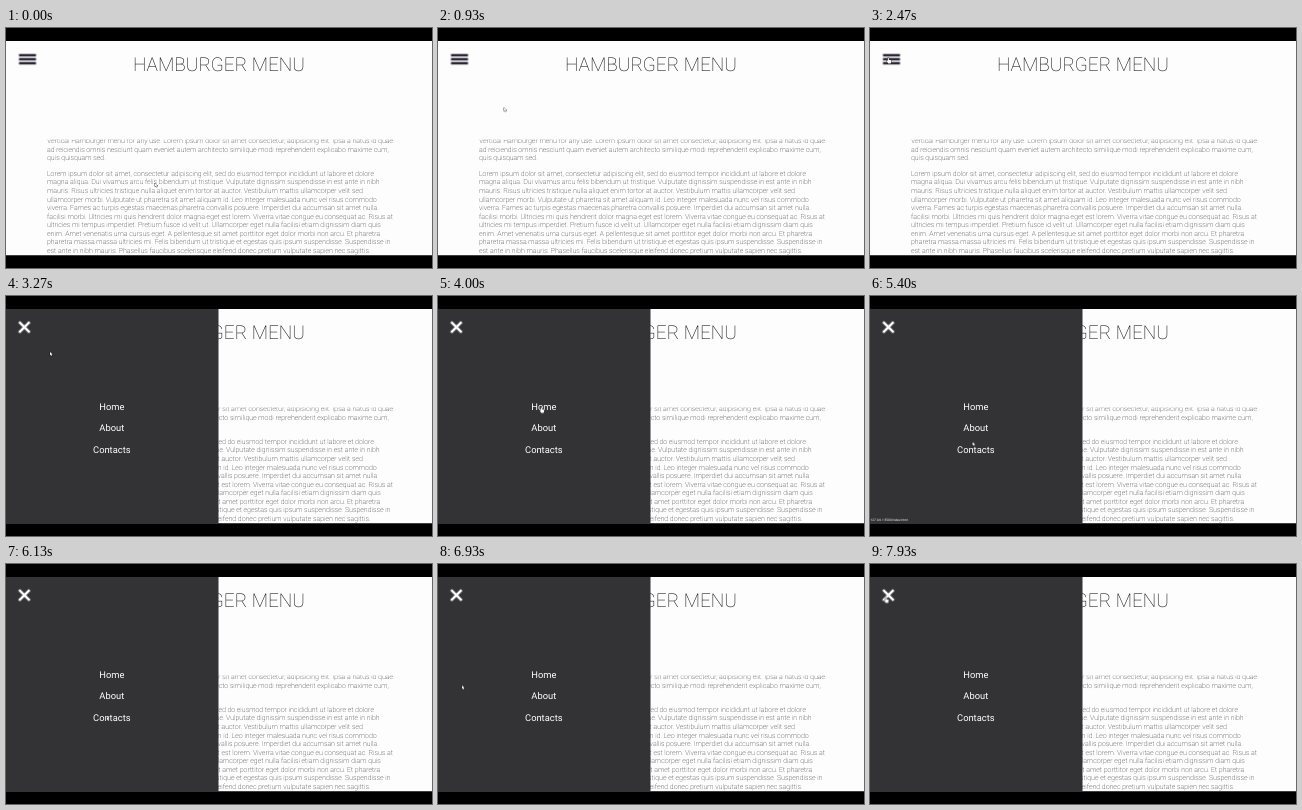
Animation, 426 px wide and 240 px high, one loop 8000 ms. Source, as an HTML page:

```html
<!DOCTYPE html>
<html lang="en">
<head>
<meta charset="utf-8">
<title>Hamburger menu</title>
<style>
  html, body { margin: 0; width: 100%; height: 100%; overflow: hidden; background: #000; }
  svg { display: block; width: 100%; height: 100%; }
  text { font-family: Roboto, sans-serif; text-rendering: geometricPrecision; }
  .title { font-size: 19px; font-weight: 100; fill: #000; text-anchor: middle; }
  .copy { font-size: 7.02px; font-weight: 100; fill: #000; }
  .links { font-size: 9.35px; fill: #fff; text-anchor: middle; }
  .status { font-size: 3.2px; fill: #fff; }

  .panel, .bar, .status, .cursor, .arrow, .hand { animation: 8s linear infinite; }
  .bar { fill: #2b2533; }
  .panel { animation-name: slide; }
  .top { animation-name: top; }
  .middle { animation-name: middle; }
  .bottom { animation-name: bottom; }
  .status { animation-name: status; animation-timing-function: step-end; }
  .cursor { animation-name: travel; }
  .arrow { animation-name: arrow; animation-timing-function: step-end; }
  .hand { animation-name: hand; animation-timing-function: step-end; }

  @keyframes slide {
    0%, 33.6% { transform: translateX(-213px); animation-timing-function: ease; }
    39.8%, 100% { transform: none; }
  }
  @keyframes top {
    0%, 33.6% { transform: translate(21.5px, 27.2px); fill: #2b2533; animation-timing-function: ease; }
    39.8%, 100% { transform: translate(18.4px, 31.2px) rotate(45deg) scaleX(.88); fill: #fff; }
  }
  @keyframes middle {
    0%, 33.6% { transform: translate(21.5px, 31.2px); opacity: 1; animation-timing-function: ease; }
    39.8%, 100% { transform: translate(21.5px, 31.2px); opacity: 0; }
  }
  @keyframes bottom {
    0%, 33.6% { transform: translate(21.5px, 35.2px); fill: #2b2533; animation-timing-function: ease; }
    39.8%, 100% { transform: translate(18.4px, 31.2px) rotate(-45deg) scaleX(.88); fill: #fff; }
  }
  @keyframes status {
    0% { opacity: 0; }
    51.5% { opacity: 1; }
    76% { opacity: 0; }
  }
  @keyframes travel {
    0% { transform: translate(149px, 155px); animation-timing-function: ease-in-out; }
    11.6% { transform: translate(66px, 79.5px); animation-timing-function: ease-in-out; }
    21%, 36% { transform: translate(17px, 30px); animation-timing-function: ease-in-out; }
    48.5%, 56% { transform: translate(102px, 111.5px); animation-timing-function: ease-in-out; }
    62%, 64.5% { transform: translate(104px, 135px); animation-timing-function: ease-in-out; }
    67.5% { transform: translate(102.5px, 146px); animation-timing-function: ease-out; }
    71%, 75% { transform: translate(104px, 154px); animation-timing-function: ease-in-out; }
    86.6% { transform: translate(24px, 121.5px); animation-timing-function: ease-in-out; }
    95%, 100% { transform: translate(14.5px, 33.5px); }
  }
  @keyframes arrow {
    0% { opacity: 1; }
    20% { opacity: 0; }
    38% { opacity: 1; }
    47% { opacity: 0; }
    57.5% { opacity: 1; }
    60% { opacity: 0; }
    66% { opacity: 1; }
    69.5% { opacity: 0; }
    76% { opacity: 1; }
    94% { opacity: 0; }
  }
  @keyframes hand {
    0% { opacity: 0; }
    20% { opacity: 1; }
    38% { opacity: 0; }
    47% { opacity: 1; }
    57.5% { opacity: 0; }
    60% { opacity: 1; }
    66% { opacity: 0; }
    69.5% { opacity: 1; }
    76% { opacity: 0; }
    94% { opacity: 1; }
  }
</style>
</head>
<body>
<svg viewBox="0 0 426 240">
  <defs>
    <clipPath id="page"><rect y="13" width="426" height="214.3"/></clipPath>
    <clipPath id="body"><rect y="111.5" width="426" height="116"/></clipPath>
  </defs>
  <rect width="426" height="240"/>
  <g clip-path="url(#page)">
    <rect y="13" width="426" height="215" fill="#fdfdfe"/>
    <text class="title" x="213" y="42.8">HAMBURGER MENU</text>
    <g id="copy" class="copy" clip-path="url(#body)"></g>
    <g class="panel">
      <rect y="13" width="212.5" height="215" fill="#333335"/>
      <g class="links">
        <text x="105.8" y="114.2">Home</text>
        <text x="105.8" y="135.2">About</text>
        <text x="105.8" y="156.8">Contacts</text>
      </g>
    </g>
    <rect class="bar top" x="-8.5" y="-1.25" width="17" height="2.5"/>
    <rect class="bar middle" x="-8.5" y="-1.25" width="17" height="2.5"/>
    <rect class="bar bottom" x="-8.5" y="-1.25" width="17" height="2.5"/>
    <text class="status" x=".5" y="225.3">127.0.0.1:5500/index.html</text>
    <g class="cursor" fill="#fff" stroke="#111" stroke-width=".7" paint-order="stroke">
      <path class="arrow" d="M0 0V3.6L.9 2.8 1.5 4.1 2.1 3.8 1.5 2.6H2.6Z"/>
      <path class="hand" d="M.8-.3H1.8V1.7L4.2 2.3V4L3.5 5.4H1.3L-.4 3.1.1 2.4.8 3Z"/>
    </g>
  </g>
</svg>
<script>
  const intro = `Vertical Hamburger menu for any use. Lorem ipsum dolor sit amet consectetur, adipisicing elit. Ipsa a natus id quae
ad reiciendis omnis nesciunt quam eveniet autem architecto similique modi reprehenderit explicabo maxime cum,
quis quisquam sed.`;
  const main = `Lorem ipsum dolor sit amet, consectetur adipiscing elit, sed do eiusmod tempor incididunt ut labore et dolore
magna aliqua. Dui vivamus arcu felis bibendum ut tristique. Vulputate dignissim suspendisse in est ante in nibh
mauris. Risus ultricies tristique nulla aliquet enim tortor at auctor. Vestibulum mattis ullamcorper velit sed
ullamcorper morbi. Vulputate ut pharetra sit amet aliquam id. Leo integer malesuada nunc vel risus commodo
viverra. Fames ac turpis egestas maecenas pharetra convallis posuere. Imperdiet dui accumsan sit amet nulla
facilisi morbi. Ultricies mi quis hendrerit dolor magna eget est lorem. Viverra vitae congue eu consequat ac. Risus at
ultricies mi tempus imperdiet. Pretium fusce id velit ut. Ullamcorper eget nulla facilisi etiam dignissim diam quis
enim. Amet venenatis urna cursus eget. A pellentesque sit amet porttitor eget dolor morbi non arcu. Et pharetra
pharetra massa massa ultricies mi. Felis bibendum ut tristique et egestas quis ipsum suspendisse. Suspendisse in
est ante in nibh mauris. Phasellus faucibus scelerisque eleifend donec pretium vulputate sapien nec sagittis.`;

  const copy = document.getElementById('copy');
  function addParagraph(paragraph, baseline) {
    paragraph.split('\n').forEach((line, i) => {
      const text = document.createElementNS(copy.namespaceURI, 'text');
      text.setAttribute('x', 41);
      text.setAttribute('y', baseline + i * 8.54);
      text.textContent = line;
      copy.append(text);
    });
  }
  addParagraph(intro, 115);
  addParagraph(main, 147.9);
</script>
</body>
</html>
```
